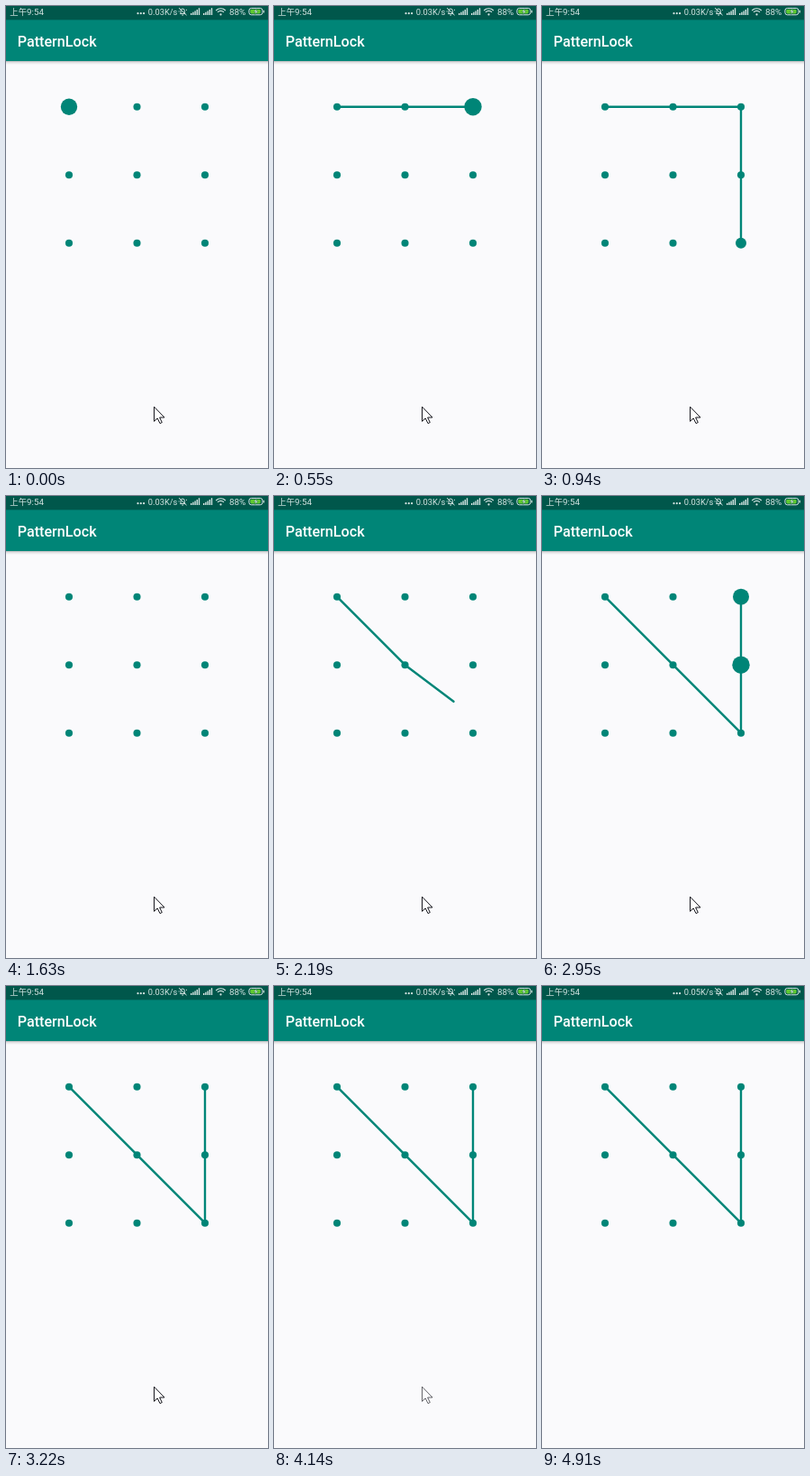
An HTML page with a canvas for the animation above (5890 ms loop, 291 by 512 pixels).

```html
<!DOCTYPE html>
<html lang="zh">
<head>
<meta charset="utf-8">
<title>PatternLock</title>
<style>
  html, body { margin: 0; width: 100%; height: 100%; overflow: hidden; background: #fafafc; }
  canvas, svg { position: absolute; left: 0; top: 0; width: 291px; height: 512px; display: block; }
  text { font-family: Roboto, "Noto Sans CJK SC", "Noto Sans CJK", sans-serif; fill: #d5e4e2; }
  .title { font-size: 16.16px; font-weight: 500; fill: #fff; }
</style>
</head>
<body>
<canvas id="stage"></canvas>
<svg viewBox="0 0 291 512">
  <defs>
    <linearGradient id="shade" x1="0" y1="0" x2="0" y2="1">
      <stop offset="0" stop-color="#000" stop-opacity=".27"/>
      <stop offset=".4" stop-color="#000" stop-opacity=".1"/>
      <stop offset="1" stop-color="#000" stop-opacity="0"/>
    </linearGradient>
  </defs>
  <rect y="61" width="291" height="4" fill="url(#shade)"/>
  <rect width="291" height="61" fill="#008577"/>
  <rect width="291" height="15.4" fill="#00574b"/>
  <text class="title" x="12.7" y="44.8">PatternLock</text>

  <text x="4.3" y="9.9" font-size="9.4">上午</text>
  <text x="23" y="9.9" font-size="9.8">9:54</text>
  <text id="speed" x="157.8" y="9.7" font-size="9.3">0.03K/s</text>
  <text x="248" y="9.8" font-size="9.9">88%</text>

  <g fill="#d5e4e2">
    <circle cx="146.5" cy="8.2" r="1.1"/>
    <circle cx="149.8" cy="8.2" r="1.1"/>
    <circle cx="153.1" cy="8.2" r="1.1"/>
    <path id="bars" d="M205 8h1.4v2h-1.4zM207.2 6.8h1.4v3.2h-1.4zM209.4 5.4h1.4v4.6h-1.4zM211.6 3.9h1.4v6.1h-1.4zM213.8 2.2h1.4v7.8h-1.4z"/>
    <use href="#bars" x="14"/>
    <circle cx="238.5" cy="9.4" r="1.1"/>
  </g>
  <g fill="none" stroke="#d5e4e2">
    <path d="M233.2 5a7.4 7.4 0 0 1 10.6 0M235 6.9a4.9 4.9 0 0 1 7 0" stroke-width="1.2"/>
    <path d="M193.2 8.6h6M194.1 8.4V5.2a2.1 2.1 0 0 1 4.2 0v3.2M195.4 10.1h1.6M192 2.2l8.6 8M191.5 6h1M200 4.4h1" stroke-width="1"/>
    <rect x="269.9" y="2.4" width="15" height="7.4" rx="2.6" stroke-width="1"/>
    <path d="M286.3 4.8v2.6" stroke-width="1.2"/>
  </g>
  <rect x="271.3" y="3.8" width="11.4" height="4.6" rx="1.3" fill="#5fcb2f"/>
  <path d="M278.4 2.8l-3 3.8h2l-.8 3 3.2-4h-2.1z" fill="#fff" stroke="#00574b" stroke-width=".4"/>
</svg>
<script>
const W = 291, H = 512, LOOP = 5890;
const TEAL = '#008577';
const GAP = 75.5, SMALL = 4.05, BIG = 9.7;
const canvas = document.getElementById('stage');
const speed = document.getElementById('speed');
const ctx = canvas.getContext('2d');
const ratio = window.devicePixelRatio || 1;
canvas.width = W * ratio;
canvas.height = H * ratio;

// Dots are numbered 1 to 9, row by row.
const spot = n => [70 + (n - 1) % 3 * GAP, 111.7 + Math.floor((n - 1) / 3) * GAP];

// Each step: start time, joined dots, swollen dots with radius, finger position.
const steps = [
  [0, '1', { 1: 9.2 }],
  [140, '1', { 1: 5.5 }, [104, 106]],
  [270, '12', { 2: BIG }, [158, 102]],
  [400, '12', { 2: 7.5 }, [199, 99.5]],
  [550, '123', { 3: BIG }],
  [700, '1236', { 3: 5, 6: 8 }, [222, 203]],
  [820, '12369', { 6: 5.5, 9: BIG }],
  [940, '12369', { 9: 6 }],
  [1090, '12369', {}],
  [1630, '', {}],
  [1780, '1', { 1: BIG }],
  [1900, '15', { 1: 5, 5: 7.5 }],
  [2040, '15', { 5: BIG }],
  [2190, '15', {}, [199.5, 227.7]],
  [2310, '15', {}, [203, 233]],
  [2430, '15', {}, [206, 239]],
  [2550, '159', { 9: 9.2 }],
  [2670, '159', { 9: 9 }],
  [2800, '159', {}, [236.5, 222]],
  [2950, '15963', { 6: BIG, 3: 9 }],
  [3090, '15963', { 3: 6 }],
  [3220, '15963', {}]
];

function line(points, alpha = 1) {
  ctx.globalAlpha = alpha;
  ctx.beginPath();
  points.forEach(p => ctx.lineTo(...p));
  ctx.stroke();
  ctx.globalAlpha = 1;
}

function drawPattern(t) {
  const [, path, sizes, finger] = steps.filter(s => s[0] <= t).pop();
  const joined = [...path].map(n => spot(+n));
  ctx.fillStyle = ctx.strokeStyle = TEAL;
  ctx.lineWidth = 2.4;
  ctx.lineCap = ctx.lineJoin = 'round';
  if (joined.length > 1) line(joined);
  if (finger) {
    const last = joined[joined.length - 1];
    const reach = Math.hypot(finger[0] - last[0], finger[1] - last[1]) / GAP;
    // A short loose end is see-through.
    line([last, finger], Math.min(1, Math.max(0, (reach - 0.2) * 4)));
  }
  for (let n = 1; n <= 9; n++) {
    ctx.beginPath();
    ctx.arc(...spot(n), sizes[n] || SMALL, 0, Math.PI * 2);
    ctx.fill();
  }
}

const arrow = new Path2D('M164.5 444.5V460.3L168.2 456.9L171 462.6L173.3 461.5L170.6 456H175.6Z');

function drawPointer(t) {
  const alpha = t < 4140 ? 1 : t < 4270 ? 0.65 : t < 4390 ? 0.3 : 0;
  if (!alpha) return;
  ctx.globalAlpha = alpha;
  ctx.fillStyle = '#fff';
  ctx.strokeStyle = '#15151c';
  ctx.lineWidth = 1;
  ctx.lineJoin = 'miter';
  ctx.fill(arrow);
  ctx.stroke(arrow);
  ctx.globalAlpha = 1;
}

function draw(t) {
  ctx.setTransform(ratio, 0, 0, ratio, 0, 0);
  ctx.fillStyle = '#fafafc';
  ctx.fillRect(0, 0, W, H);
  drawPattern(t);
  drawPointer(t);
  speed.textContent = t < 3710 ? '0.03K/s' : '0.05K/s';
}

const start = performance.now();
function tick(now) {
  draw(Math.max(0, now - start) % LOOP);
  requestAnimationFrame(tick);
}
draw(0);
requestAnimationFrame(tick);
</script>
</body>
</html>
```
